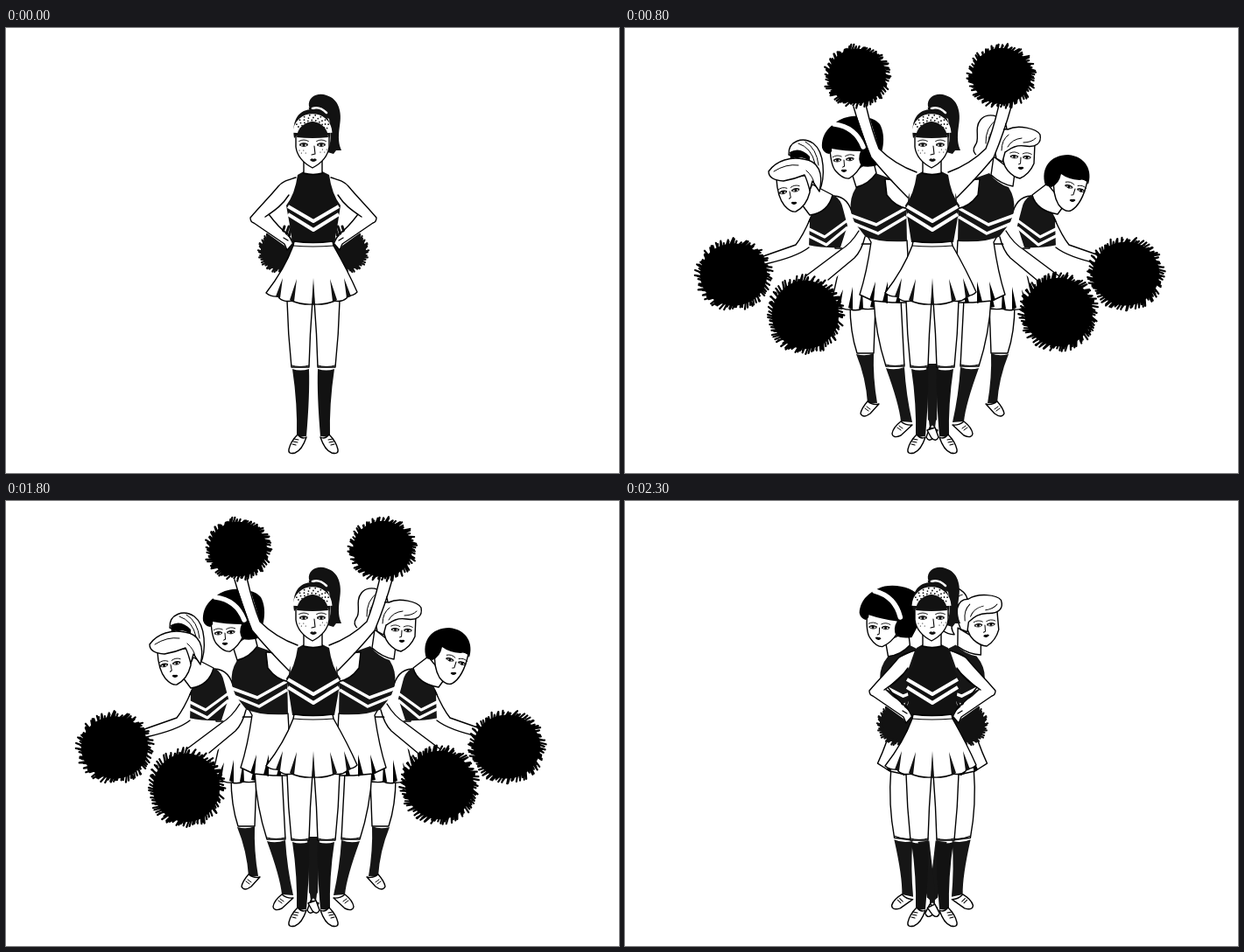
An HTML page with a canvas for the animation above (2.4 s loop, 700x509 px).

```html
<!DOCTYPE html>
<html lang="en">
<head>
<meta charset="utf-8">
<title>Cheer squad</title>
<style>
html, body { margin: 0; width: 100%; height: 100%; overflow: hidden; background: #fff; }
canvas { display: block; }
</style>
</head>
<body>
<canvas id="stage" width="700" height="509"></canvas>
<script>
const ctx = document.getElementById('stage').getContext('2d');
const LOOP = 2400, AXIS = 351;
const BLACK = '#000', INK = '#121212', CLOTH = '#161616', WHITE = '#fff';

const fill = (d, color = WHITE) => { ctx.fillStyle = color; ctx.fill(new Path2D(d)); };
const line = (d, width = 1.4, color = BLACK) => {
  ctx.strokeStyle = color;
  ctx.lineWidth = width;
  ctx.stroke(new Path2D(d));
};
const shape = (d, color = WHITE, width = 1.4) => { fill(d, color); line(d, width); };
const dot = (x, y, r, color = BLACK) => {
  ctx.fillStyle = color;
  ctx.beginPath();
  ctx.arc(x, y, r, 0, 7);
  ctx.fill();
};
function stripe(d, width) {
  ctx.lineCap = 'butt';
  line(d, width, WHITE);
  ctx.lineCap = 'round';
}

function group(draw) {
  ctx.save();
  draw();
  ctx.restore();
}
function mirrored(draw) {
  group(() => {
    ctx.translate(2 * AXIS, 0);
    ctx.scale(-1, 1);
    draw();
  });
}
function bothSides(draw) {
  draw();
  mirrored(draw);
}

function pom(x, y, rx, ry = rx, color = BLACK) {
  let seed = x * 31 + y * 17;
  const random = () => (seed = (seed * 16807 + 11) % 2147483647) / 2147483647;
  ctx.fillStyle = ctx.strokeStyle = color;
  ctx.lineWidth = 2.2;
  ctx.beginPath();
  ctx.ellipse(x, y, rx * 0.87, ry * 0.87, 0, 0, 7);
  ctx.fill();
  ctx.beginPath();
  const count = Math.round(rx * 2.3);
  for (let i = 0; i < count; i++) {
    const a = i / count * Math.PI * 2, tip = a + 0.06 + 0.12 * random();
    const reach = 0.9 + 0.12 * random();
    ctx.moveTo(x + Math.cos(a) * rx * 0.75, y + Math.sin(a) * ry * 0.75);
    ctx.lineTo(x + Math.cos(tip) * rx * reach, y + Math.sin(tip) * ry * reach);
  }
  ctx.stroke();
}

function eye(x, y, size = 1) {
  group(() => {
    ctx.translate(x, y);
    ctx.scale(size, size);
    line('M-5 0Q0 -4 5 0Q0 3.5 -5 0', 0.9);
    line('M-5 -1Q0 -4 5 -1', 1.2);
    dot(0, -0.2, 1.7);
    line('M-6 -5Q0 -8.5 6 -5', 1);
  });
}
function features(x, y, tilt, mouthX, mouthY) {
  group(() => {
    ctx.translate(x, y);
    ctx.rotate(tilt);
    eye(-7.5, 0, 0.85);
    eye(7, 0, 0.85);
    line('M0 0L0 7L-2 8', 1);
  });
  fill(`M${mouthX - 3.5} ${mouthY}q2 -2 3.5 -1q2 -1 3.5 1q-3.5 4 -7 0`, BLACK);
}

// Center girl
function hipArm() {
  pom(310, 255, 22, 24, INK);
  line('M314 240L318 227M319 238L323 227M323 238L326 228', 3, INK);
  fill('M331 171L312 180L279 217L282 223L318 249L321 254L327 247L325 241L297 216L324 191Z');
  line('M331 171C322 174 316 175 311 181C302 192 290 204 279 217Q279 222 283 223L318 247L321 254L327 247');
  line('M323 191C316 202 308 208 296 216M300 213Q312 229 322 236L327 245M317 240L322 243');
}
function raisedArm() {
  fill('M261 90L281 148L323 194L333 166L290 138L275 88Z');
  line('M261 90C267 112 274 131 281 148Q300 171 323 194');
  line('M275 88Q282 118 290 138Q308 156 333 165');
}
function centerLeg() {
  shape('M321 312Q322 350 326 388L346 388Q347 350 350 312');
  fill('M327 390Q336 393 346 390Q347 420 343 467L332 468Q333 430 327 390Z', INK);
  line('M326 386Q336 389 346 386', 1);
  shape('M333 465Q325 473 323 482Q322 488 330 486Q338 483 343 468Q338 471 333 465Z');
  line('M329 470l5 1M328 473l5 1M327 476l4 1', 1.2);
}
function centerHead() {
  fill('M346 90C344 78 357 73 366 77C380 81 384 96 381 112C379 126 380 133 383 140L377 140L374 144L367 142C372 132 371 118 369 104Z', INK);
  line('M348 92Q358 87 368 98', 4.5, INK);
  line('M350 92Q358 89 366 97', 2.5, WHITE);
  shape('M340 150L340 166Q351 169 361 166L361 150Z');
  shape('M331 118L331 136Q333 151 350 160Q367 151 369 136L369 118Z');
  fill('M329 126C326 104 335 93 350 93C365 93 373 106 370 126L367 122Q350 127 332 123Z', INK);
  stripe('M332 120C333 97 367 97 368 120', 9);
  for (let i = 0; i < 26; i++) {
    const a = Math.PI * (1.07 + 0.86 * i / 25), r = [-3, 0, 3][i % 3];
    dot(350 + Math.cos(a) * (17 + r), 118 + Math.sin(a) * (15.5 + r), 0.9, INK);
  }
  fill('M332 125Q333 110 350 107Q367 110 368 125Q350 127 332 125Z', INK);
  eye(340, 134, 0.9);
  eye(360, 134, 0.9);
  line('M352 135L353 144L349 145', 1.1);
  fill('M347 151q2 -3 4 -1q2 -2 4 1q-4 4 -8 0', INK);
  for (let i = 0; i < 4; i++) {
    dot(335 + i * 2.4, 140 + i % 2 * 3, 0.6);
    dot(359 + i * 2.4, 142 - i % 2 * 3, 0.6);
  }
}
function centerGirl(armsUp) {
  bothSides(centerLeg);
  bothSides(armsUp ? raisedArm : hipArm);
  fill('M333 168L340 164Q350 169 361 164L369 168Q372 190 382 203Q379 224 375 245L327 245Q324 224 320 203Q330 190 333 168Z', INK);
  stripe('M322 204L351 221L380 204M322 213L351 231L380 213', 4);
  shape('M329 244Q350 247 373 244L374 249Q391 279 401 302Q396 307 390 306L389 309Q383 314 376 312Q364 317 351 316Q338 317 326 312Q318 314 312 309L311 307Q303 308 297 303Q318 276 328 249Z');
  line('M328 249Q350 251 374 249', 1.1);
  bothSides(() => fill('M316 286L308 307L313 309ZM332 287L324 311L329 313Z', INK));
  fill('M351 286L349 316L353 316Z', INK);
  centerHead();
}

// Second row
function innerBody(arms) {
  fill('M345 384L358 384L356 448L348 458L346 440Z', CLOTH);
  shape('M348 457L344 468Q347 474 352 469L357 460Z');
  shape('M284 310Q286 350 298 387L319 387L315 310Z');
  fill('M298 389Q308 392 319 388Q321 420 328 451L315 450Q313 430 298 389Z', CLOTH);
  line('M298 385Q308 388 319 385', 1);
  shape('M315 450Q306 457 305 464Q306 470 315 466L328 454Q321 455 315 450Z');
  line('M313 455l4 3M311 457l4 3', 1);
  shape('M277 238L322 243L326 314L305 314L283 312L268 305Q276 280 281 245Z');
  fill('M286 290L279 311L284 313ZM300 290L294 313L300 315ZM314 295L309 314L314 315Z', BLACK);
  fill('M264 182Q277 178 286 166L300 171Q315 181 321 200L322 244Q290 246 270 237Q260 222 258 208Q256 195 264 182Z', CLOTH);
  stripe('M257 214L287 225L321 206M260 223L289 235L321 216', 3.5);
  if (!arms) return;
  shape('M297 173Q312 172 324 188L324 207Q309 205 299 191Z');
  fill('M260 220L248 252L205 285L235 292L263 262L274 238Z');
  line('M267 232Q258 247 246 254L206 284M274 239Q270 255 262 263L232 288');
}
function bobHead() {
  shape('M259 166L264 182Q278 179 287 166L283 150Z');
  shape('M234 137Q235 158 241 164Q249 173 256 172Q266 166 271 154L272 135Z');
  fill('M225 137C224 120 235 112 242 107C257 97 283 100 291 110C299 125 294 143 288 157Q279 160 270 158Q265 150 269 141Q251 141 236 138Q237 142 233 144Q227 143 225 137Z', BLACK);
  line('M239 110Q263 113 272 136', 5.5, WHITE);
  features(250, 151, -0.08, 250, 163);
}
function curledHead() {
  shape('M436 117C436 102 415 94 406 105C398 115 406 127 400 134Q395 141 403 147Q408 153 416 154Q412 146 416 140Q418 126 427 120Z');
  line('M425 104Q411 114 412 132M431 110Q419 112 415 127', 1);
  shape('M421 147L418 168Q430 179 443 181L445 166Z');
  shape('M431 136Q430 155 437 163Q444 171 451 172Q462 167 467 155L468 132Z');
  shape('M424 149C419 130 423 114 437 116C449 110 470 115 474 122C476 132 469 137 457 135C444 133 438 140 434 142L431 153Z');
  line('M430 140Q430 128 438 122M437 136Q442 127 453 126M455 131Q464 131 469 126', 1);
  features(452, 148, 0.06, 452, 160);
}

// Back row
function outerBody(arms) {
  shape('M257 316Q257 348 265 372L284 372L286 316Z');
  fill('M264 373Q275 376 284 372Q283 400 288 429L277 429Q275 400 264 373Z', CLOTH);
  shape('M277 427Q270 435 269 441Q272 447 280 441L290 430Q283 432 277 427Z');
  line('M276 433l4 3M274 435l4 3', 1);
  shape('M248 247L292 247L291 319Q281 323 271 321Q264 324 258 322Q250 323 245 318Q238 319 235 314Q244 285 248 247Z');
  fill('M249 299L241 316L246 318ZM260 296L255 320L260 322ZM271 297L267 321L272 322ZM284 302L280 319L285 320Z', BLACK);
  shape('M238 192Q256 193 260 215Q265 226 274 234Q268 249 252 252L240 252Z');
  fill('M209 222Q212 214 216 208Q231 205 238 191Q247 196 249 207L254 226L246 251Q228 252 208 248Z', CLOTH);
  stripe('M208 229L228 239L254 220M208 237L230 248L254 228', 3.2);
  if (arms === 'out') {
    fill('M211 221L195 248L158 260L162 271L210 250Z');
    line('M212 217Q203 238 195 248L158 261M210 251Q196 262 160 270');
  } else if (arms === 'up') {
    fill('M211 216L174 213L146 172L134 178L165 226L208 240Z');
    line('M211 216L174 213L146 172M134 178L165 226L208 240');
  }
}
function bunHead() {
  shape('M187 145C186 129 203 124 215 132C228 142 229 170 222 187Q216 168 209 153Z');
  line('M198 132Q213 137 217 155M206 130Q219 138 221 157', 1);
  shape('M202 202L211 214Q232 211 237 191L214 179Z');
  shape('M173 173Q174 193 182 203Q189 211 195 210Q207 204 211 188L211 168Z');
  shape('M164 164C173 151 190 147 204 150C221 152 227 166 222 187L214 175L211 186Q208 174 205 168Q193 173 181 175Q164 174 164 164Z');
  line('M170 164Q184 155 198 157M207 163Q215 170 216 178', 1);
  fill('M188 142Q200 135 211 147L211 152Q200 145 189 150Z', BLACK);
  features(188, 187, -0.18, 193, 200);
}
function cropHead() {
  shape('M482 178L465 191Q470 209 494 213L502 202Z');
  shape('M490 172Q488 190 495 202Q502 211 509 209Q522 202 528 175L500 162Z');
  fill('M480 180C474 160 486 145 506 145C527 147 534 164 529 179Q526 172 519 174Q506 173 498 167Q496 178 487 182Z', BLACK);
  features(514, 184, 0.3, 511, 197);
}

// Each girl leans toward the center by turning about her feet.
function girl(right, lean, footX, floor, body, head) {
  const pivot = right ? 2 * AXIS - footX : footX;
  group(() => {
    ctx.translate(pivot, floor);
    ctx.rotate(right ? -lean : lean);
    ctx.translate(-pivot, -floor);
    right ? mirrored(body) : body();
    head();
  });
}
function backRow(lean, arms) {
  girl(false, lean, 280, 440, () => outerBody(arms), bunHead);
  girl(true, lean, 280, 440, () => outerBody(arms), cropHead);
}
function secondRow(lean, arms) {
  girl(false, lean, 316, 460, () => innerBody(arms), bobHead);
  girl(true, lean, 316, 460, () => innerBody(arms), curledHead);
}

function cheer(high) {
  backRow(0, high ? 'out' : 'up');
  if (high) {
    pom(124, 282, 44, 41);
    pom(572, 281, 44, 42);
  } else {
    pom(128, 136, 43, 42);
    pom(570, 136, 43, 42);
  }
  secondRow(0, true);
  pom(206, 328, 44, 45);
  pom(495, 325, 45, 45);
  centerGirl(high);
  if (high) {
    pom(265, 55, 38, 36);
    pom(430, 55, 39, 37);
  }
}
const poses = {
  solo: () => centerGirl(false),
  peek: () => { secondRow(0.13, false); centerGirl(false); },
  spread: () => { backRow(0.12); secondRow(0.05, false); centerGirl(false); },
  fan: () => { backRow(0); secondRow(0, false); centerGirl(false); },
  high: () => cheer(true),
  low: () => cheer(false)
};

const timeline = [
  [0, 'solo'], [500, 'peek'], [600, 'spread'], [700, 'fan'],
  [800, 'high'], [1000, 'low'], [1200, 'high'], [1300, 'low'],
  [1500, 'high'], [1600, 'low'], [1800, 'high'], [1900, 'low'],
  [2100, 'fan'], [2200, 'spread'], [2300, 'peek']
];

function render(time) {
  ctx.fillStyle = WHITE;
  ctx.fillRect(0, 0, 700, 509);
  ctx.lineCap = ctx.lineJoin = 'round';
  const pose = timeline.filter(([start]) => start <= time).pop()[1];
  poses[pose]();
}

const begin = performance.now();
function tick() {
  render((performance.now() - begin) % LOOP);
  requestAnimationFrame(tick);
}
tick();
</script>
</body>
</html>
```
